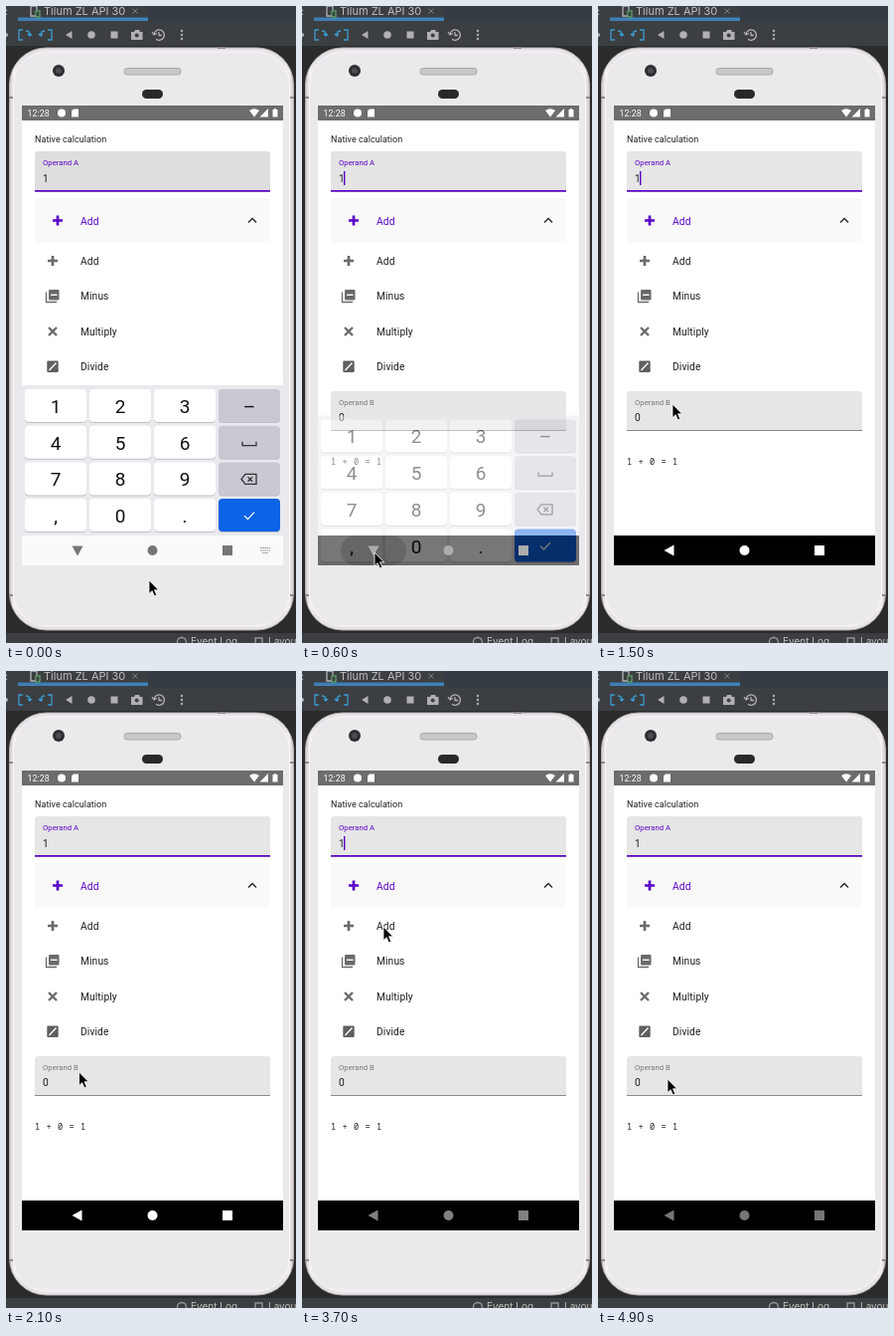
An HTML page for the animation above (5 s loop, 292 by 640 pixels).

```html
<!DOCTYPE html>
<html lang="en">
<head>
<meta charset="utf-8">
<style>
html, body { margin: 0; width: 100%; height: 100%; overflow: hidden; background: #2b2b2b; }
svg { display: block; width: 100vw; height: 100vh; }
text { font-family: Roboto, sans-serif; font-size: 10.24px; letter-spacing: .1px; fill: #1c1c1c; }
.ide { font-family: Inter, sans-serif; fill: #bdbfc1; letter-spacing: 0; }
.small { font-size: 7.68px; letter-spacing: .03px; }
.mono { font-family: "Noto Sans Mono", monospace; font-size: 8.6px; letter-spacing: .6px; }
.digit { font-size: 19px; letter-spacing: 0; text-anchor: middle; fill: #111; }
.purple { fill: #5800c4; }
.line { fill: none; stroke-width: 1.3; }
</style>
</head>
<body>
<svg viewBox="0 0 292 640" preserveAspectRatio="none">
  <defs>
    <clipPath id="screen"><rect x="16" y="100" width="263" height="462"/></clipPath>
    <linearGradient id="shell">
      <stop offset="0" stop-color="#cfc6cc"/><stop offset=".015" stop-color="#f3eff2"/>
      <stop offset=".035" stop-color="#e7e4e8"/><stop offset=".965" stop-color="#e7e4e8"/>
      <stop offset=".985" stop-color="#f3eff2"/><stop offset="1" stop-color="#cfc6cc"/>
    </linearGradient>
    <path id="plus" d="M-5 0H5M0-5V5" fill="none" stroke-width="2.7"/>
  </defs>

  <!-- editor window -->
  <rect width="292" height="40" fill="#3c3f41"/>
  <rect x="143" width="149" height="16" fill="#343b42"/>
  <rect x="12" y="11.5" width="131" height="3.5" fill="#3f7fb5"/>
  <text class="ide" x="-1" y="9" font-size="11">:</text>
  <text class="ide" x="38" y="9" style="font-size:11px">Tilum ZL API 30</text>
  <g class="line" stroke="#afb1b3">
    <path d="M25 0V10H30M25 0H31V4"/>
    <rect x="30" y="5" width="4" height="6" stroke="#62a06a"/>
    <path d="M127.500 2.500l5 5m0-5l-5 5" stroke="#7d8082" stroke-width="1"/>
    <path d="M17 24h-4v10h4M20 25c3 0 4 2 4 4m-2-1l2 2 2-2" stroke="#3d9bd0"/>
    <path d="M42 24h4v10h-4M39 25c-3 0-4 2-4 4m-2-1l2 2 2-2" stroke="#3d9bd0"/>
    <path d="M149 29a5.200 5.200 0 1 1 2 4.200M147 26l2 3 3-1.500M154 26v3.500h3"/>
  </g>
  <g fill="#afb1b3">
    <circle cx="0" cy="29" r="2"/>
    <path d="M66.500 25v8L60 29Z"/>
    <circle cx="86" cy="29" r="3.800"/>
    <rect x="105.500" y="25.500" width="7" height="7"/>
    <path d="M126 26h3l1-2h4l1 2h2.500v8H126Z"/>
    <circle cx="131.700" cy="29.500" r="2" fill="#3c3f41"/>
    <circle cx="177" cy="25" r="1.200"/><circle cx="177" cy="29" r="1.200"/><circle cx="177" cy="33" r="1.200"/>
  </g>
  <rect y="630" width="292" height="10" fill="#3c3f41"/>
  <circle class="line" cx="177" cy="639" r="4.500" stroke="#9a9c9e"/>
  <text class="ide" x="186" y="642" style="font-size:10px">Event Log</text>
  <rect class="line" x="251" y="635" width="7" height="8" stroke="#9a9c9e"/>
  <text class="ide" x="264" y="642" style="font-size:10px">Layout</text>

  <!-- phone -->
  <rect x="3.500" y="42" width="286" height="585" rx="37" fill="url(#shell)" stroke="#b9b0b6"/>
  <rect x="7.500" y="46" width="278" height="577" rx="34" fill="#ebe9ec" stroke="#f8f6f8"/>
  <path d="M213 42h8M3 92h4M286 92h4M3 592h4M286 592h4" stroke="#8d878b" stroke-width="2"/>
  <circle cx="53" cy="65" r="6" fill="#2e2e30"/>
  <circle cx="53" cy="65" r="3" fill="#4b4b52"/>
  <rect x="119" y="62.500" width="57" height="6.500" rx="3" fill="#c9c7ca" stroke="#a9a7aa"/>
  <rect x="137" y="84" width="21" height="9" rx="4.500" fill="#29282b"/>

  <g clip-path="url(#screen)">
    <rect x="16" y="100" width="263" height="462" fill="#fff"/>
    <rect x="16" y="100" width="263" height="15" fill="#6d6d6d"/>
    <text x="21.500" y="111" style="font-size:8.8px;fill:#fff">12:28</text>
    <g fill="#fff">
      <circle cx="56" cy="107.500" r="4"/>
      <path d="M68 103.500h5v8h-7v-6ZM245 105q5-3.500 10 0l-5 6.500ZM264 103v8.500h-8.500ZM268.500 104h1.500v-1h2v1h1.500v7.500h-5Z"/>
    </g>
    <text x="29" y="137" style="font-size:8.96px;letter-spacing:.06px">Native calculation</text>

    <path id="fieldA" d="M29 187V149q0-3 3-3H263q3 0 3 3V187Z"/>
    <rect class="purple" x="29" y="185" width="237" height="1.700"/>
    <text class="small purple" x="37" y="160">Operand A</text>
    <text x="37" y="177">1</text>
    <rect id="caret" class="purple" x="42" y="166" width="1.400" height="14"/>

    <rect x="29" y="193" width="237" height="45" fill="#f9f9f9"/>
    <use href="#plus" x="52" y="215.500" stroke="#5800c4"/>
    <text class="purple" x="75" y="219.500">Add</text>
    <path class="line" d="M244 217.500l4-4 4 4" stroke="#222"/>

    <g id="items"></g>
    <use href="#plus" x="47" y="256" stroke="#6a6a6a"/>
    <path d="M40.500 287.500V297.500H51" class="line" stroke="#6a6a6a"/>
    <rect x="43" y="285" width="10.500" height="10.500" rx="1" fill="#6a6a6a"/>
    <path d="M45 290.300h6.500" stroke="#fff" stroke-width="1.400"/>
    <path d="M43 323l8 8m0-8l-8 8" stroke="#6a6a6a" stroke-width="2.300"/>
    <rect x="41.300" y="356.500" width="11.400" height="11.400" rx="1.200" fill="#5f5f5f"/>
    <path d="M43.500 366l7-7.500" stroke="#fff" stroke-width="1.300"/>

    <path d="M29 427V390q0-3 3-3H263q3 0 3 3V427Z" fill="#e6e6e6"/>
    <rect x="29" y="426" width="237" height="1" fill="#8c8c8c"/>
    <text class="small" x="37" y="400.500" style="fill:#777">Operand B</text>
    <text x="37" y="417">0</text>
    <text class="mono" x="29" y="461">1 + 0 = 1</text>

    <rect x="16" y="532" width="263" height="30"/>
    <g id="board">
      <rect x="16" y="381" width="263" height="181" fill="#e9eaee"/>
      <g id="keys"></g>
      <rect x="16" y="532" width="263" height="40" fill="#fafafa"/>
      <path d="M256 544.500h10M256 547h10M258 549.500h6" stroke="#8a8a8a" stroke-dasharray="1.500 .7"/>
    </g>
    <rect id="ripple" x="39" y="532" width="66" height="30" rx="15"/>
    <g id="nav">
      <path id="back" d="M76.500 541.500v11L66.500 547Z"/>
      <circle cx="147.500" cy="547" r="5"/>
      <rect x="218" y="542" width="10" height="10"/>
    </g>
  </g>
  <path id="mouse" d="M0 0V13.500L3.200 10.700 5.400 15.800 7.700 14.800 5.500 9.800H9.700Z" stroke="#fff" stroke-width=".8"/>
</svg>
<script>
const $ = id => document.getElementById(id);
const set = (id, name, value) => $(id).setAttribute(name, value);
const ramp = (t, a, b) => Math.min(1, Math.max(0, (t - a) / (b - a)));
const grey = v => `rgb(${v},${v},${v})`;

$('items').innerHTML = ['Add', 'Minus', 'Multiply', 'Divide']
  .map((s, i) => `<text x="75" y="${260 + i * 35.4}">${s}</text>`).join('');

const glyphs = ['123–', '456_', '789<', ',0.!'];
const icons = {
  _: 'M-7-1V3H7V-1',
  '<': 'M-8 0l4-5H7V5H-4ZM-1.500-2.300l4.600 4.600m0-4.600l-4.600 4.600',
  '!': 'M-5 0l3.500 3.500 6.500-7'
};
$('keys').innerHTML = glyphs.map((row, r) => [...row].map((g, c) => {
  const x = 19 + c * 65, y = 385 + r * 36.7;
  const fill = g === '!' ? '#0b63e5' : c === 3 ? '#c8c9d3' : '#fff';
  const face = icons[g]
    ? `<path class="line" transform="translate(${x + 31} ${y + 17})" d="${icons[g]}" stroke="${g === '!' ? '#fff' : '#333'}"/>`
    : `<text class="digit" x="${x + 31}" y="${y + 24}">${g}</text>`;
  return `<rect x="${x}" y="${y + 1}" width="62" height="33" rx="4" fill="#bfc0c6"/>
    <rect x="${x}" y="${y}" width="62" height="33" rx="4" fill="${fill}"/>${face}`;
}).join('')).join('');

// time, x, y of the pointer tip
const path = [
  [0, 144, 577], [400, 73, 549], [650, 73, 549], [1000, 87, 433], [1200, 79, 404],
  [1500, 75, 400], [2400, 73, 404], [2700, 72, 407], [3100, 72, 407], [3500, 82, 257],
  [4100, 82, 257], [4500, 56, 162], [4800, 52, 157], [4900, 70, 410], [5000, 70, 410]
];

function pointer(t) {
  const i = path.findIndex(p => p[0] > t);
  const [a, b] = [path[i - 1], path[i]];
  const u = ramp(t, a[0], b[0]), k = u * u * (3 - 2 * u);
  return `translate(${a[1] + (b[1] - a[1]) * k} ${a[2] + (b[2] - a[2]) * k})`;
}

function draw(now) {
  const t = now % 5000, beat = t % 1000;
  set('mouse', 'transform', pointer(t));
  set('caret', 'opacity', beat >= 250 && beat < 750 ? 1 : 0);
  set('fieldA', 'fill', grey(222 + 8 * ramp(t, 200, 700)));

  const hide = ramp(t, 500, 690);
  set('board', 'opacity', 1 - hide);
  set('board', 'transform', `translate(0 ${39 * (1 - (1 - hide) ** 2)})`);
  set('ripple', 'opacity', .14 * ramp(t, 380, 480) * (1 - ramp(t, 600, 850)));
  set('back', 'transform', `rotate(${-90 * (1 - ramp(t, 640, 800))} 72 547)`);

  const light = ramp(t, 500, 750) * (1 - ramp(t, 3450, 3720));
  set('nav', 'fill', grey(118 + 137 * light));
  requestAnimationFrame(draw);
}
draw(0);
</script>
</body>
</html>
```
